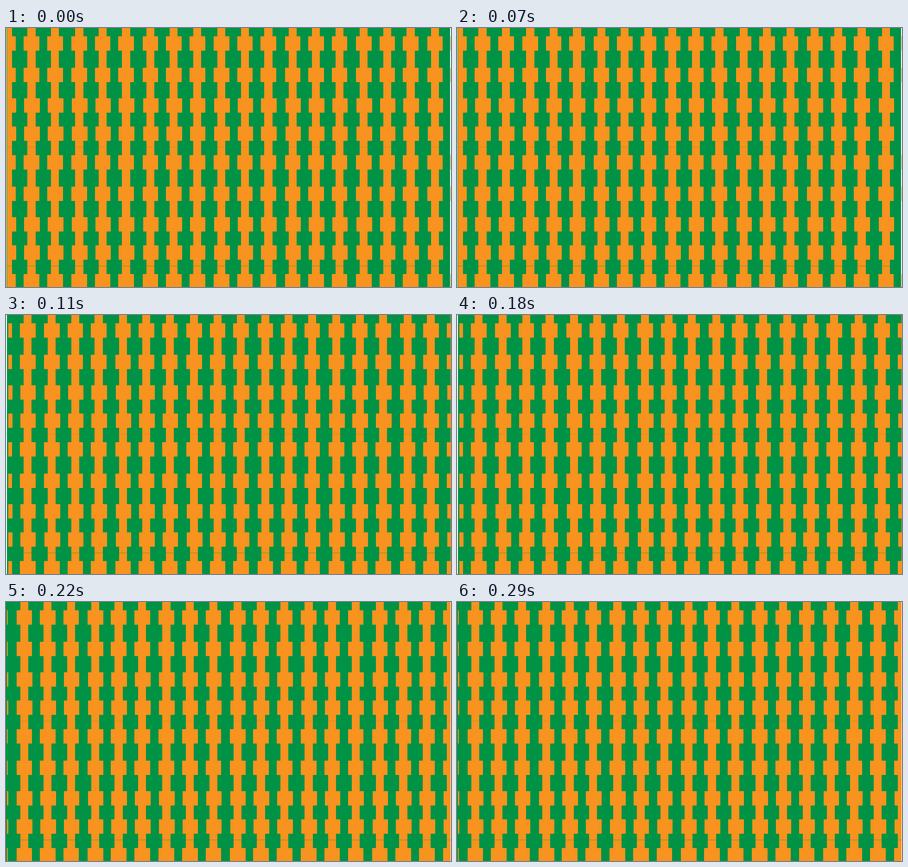
Write an HTML page that moves like this. It is 960 px wide and 560 px high and loops after 330 ms.

```html
<!DOCTYPE html>
<html lang="en">
<head>
<meta charset="utf-8">
<title>Woven stripes</title>
<style>
  html, body { margin: 0; width: 100%; height: 100%; overflow: hidden; background: #fff; }
  svg { display: block; width: 960px; height: 560px; }
</style>
</head>
<body>
<svg viewBox="0 0 960 560" shape-rendering="crispEdges">
  <rect id="ground" height="560" fill="#009245"/>
  <g id="pattern">
    <path id="stripes" fill="#f7931e"/>
    <path id="upperSeam" fill="#d48a22"/>
    <path id="lowerSeam" fill="#6f9335"/>
  </g>
  <rect id="leftGround" height="560" fill="#009245"/>
  <rect id="leftMargin" height="560" fill="#fff"/>
  <rect id="rightMargin" height="560" fill="#fff"/>
</svg>
<script>
const WIDTH = 960, HEIGHT = 560, STEP = 110;
const TILE_W = 153.46, TILE_H = 257.3;
const STRIPE_W = 17.2, BLOCK_W = 33.6, BLOCK_H = 31;

const columns = [
  { x: 46.3, seam: true },
  { x: 97, seam: false },
  { x: 149.3, seam: true }
];
const rows = [
  { y: 17.7, dx: 0 },
  { y: 85.5, dx: 0 },
  { y: 151.5, dx: 0.9 },
  { y: 213.1, dx: 0.9 }
];
// ground: left edge of the green, clip: left edge of the stripes
const poses = [
  { shift: 0, ground: 1, clip: 2, groundEnd: 958.4, end: WIDTH },
  { shift: -59.1, ground: 2, clip: 5, groundEnd: WIDTH, end: WIDTH },
  { shift: 34.7, ground: 0, clip: 2, groundEnd: WIDTH, end: 959 }
];

const byId = id => document.getElementById(id);
const box = (x, y, w, h) => `M${x.toFixed(2)} ${y.toFixed(2)}h${w}v${h}h${-w}z`;

function buildPattern() {
  let stripes = "", upper = "", lower = "";
  for (let i = -2; i <= 7; i++) {
    for (const column of columns) {
      const x = column.x + i * TILE_W;
      stripes += box(x, 0, STRIPE_W, HEIGHT);
      for (let top = 0; top < HEIGHT; top += TILE_H) {
        for (const row of rows) {
          stripes += box(x - 8 + row.dx, top + row.y, BLOCK_W, BLOCK_H);
        }
      }
      if (column.seam) upper += box(x, 257, STRIPE_W, 1);
      lower += box(x, 514, STRIPE_W, 1);
    }
  }
  // Nonzero fill keeps overlapping boxes solid.
  byId("stripes").setAttribute("d", stripes);
  byId("upperSeam").setAttribute("d", upper);
  byId("lowerSeam").setAttribute("d", lower);
}

function span(id, from, to) {
  const rect = byId(id);
  rect.setAttribute("x", from);
  rect.setAttribute("width", to - from);
}

function render(time) {
  const pose = poses[Math.floor(time / STEP) % poses.length];
  byId("pattern").setAttribute("transform", `translate(${pose.shift} 0)`);
  span("ground", pose.ground, pose.groundEnd);
  span("leftGround", pose.ground, pose.clip);
  span("leftMargin", 0, pose.ground);
  span("rightMargin", pose.end, WIDTH);
}

buildPattern();
render(0);
const start = performance.now();
function tick() {
  render(performance.now() - start);
  requestAnimationFrame(tick);
}
requestAnimationFrame(tick);
</script>
</body>
</html>
```
